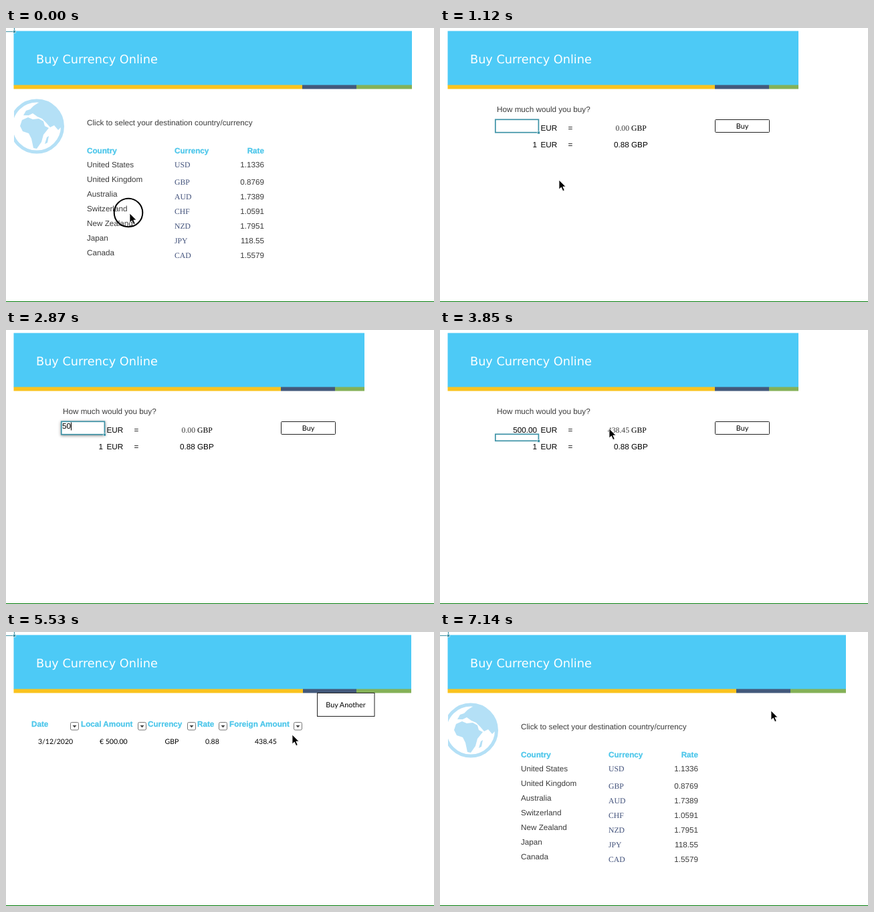
These frames come from a looping animation (640 px wide and 411 px high, 7210 ms). An HTML page:

```html
<!DOCTYPE html>
<html lang="en">
<head>
<meta charset="utf-8">
<title>Buy Currency Online</title>
<style>
  html, body { margin: 0; width: 100%; height: 100%; overflow: hidden; background: #fff; }
  svg { display: block; width: 100%; height: 100%; }
  text {
    font: 11.7px "Liberation Sans", Arial, sans-serif; fill: #3b3b3b;
    text-rendering: geometricPrecision;
  }
  .title { font: 17.7px "DejaVu Sans", Verdana, sans-serif; fill: #fff; }
  .head { font-weight: bold; fill: #4cc6ea; stroke: #4cc6ea; stroke-width: .25; }
  .code { font-family: "Liberation Serif", Times, serif; fill: #40507a; }
  .serif { font-family: "Liberation Serif", Times, serif; }
  .ink { fill: #000; }
  .cell { font: 10.5px Lato, sans-serif; fill: #000; }
  .label { font: 10.8px Lato, sans-serif; fill: #000; }
  .end { text-anchor: end; }
  .mid { text-anchor: middle; }
  .button { fill: #fff; stroke: #222; }
  .pressed .button { fill: #eee; stroke: #3c90ac; stroke-width: 1.6; }
  .pressed .label { fill: #777; }
  .select { fill: none; stroke: #3d92a6; stroke-width: 1.7; }
  .handle { fill: #3d92a6; stroke: #fff; stroke-width: .6; }
  .edit { fill: #fff; filter: drop-shadow(0 1px 2px #0007); }
  .land { fill: #b4e0f6; }
</style>
</head>
<body>
<svg viewBox="0 0 640 411">
  <defs>
    <clipPath id="sheet"><rect x="12" y="92" width="600" height="110"/></clipPath>
  </defs>

  <!-- data-on lists the spans in ms during which an element is visible -->
  <g data-on="0-840 6720-7210">
    <g data-banner="607 443 524"></g>
    <g clip-path="url(#sheet)">
      <circle cx="46" cy="147.5" r="38.5" fill="#fff" stroke="#b4e0f6" stroke-width="5"/>
      <path class="land" d="M24 138L33 134L40 137L49 136L56 140L58 147L64 150L56 160L53 171L46 181L41 180L38 166L34 158L25 155L21 147Z"/>
      <path class="land" d="M26 131L30 124L36 122L41 117L47 113L55 109L66 112L76 121L83 134L85 146L78 153L72 146L66 149L60 142L54 136L47 133L40 128L34 131Z"/>
      <path class="land" d="M61 164L64 162L62 172L58 174Z"/>
    </g>
    <text x="121" y="146">Click to select your destination country/currency</text>
    <text class="head" x="121" y="187.5">Country</text>
    <text class="head" x="252" y="187.5">Currency</text>
    <text class="head end" x="386" y="187.5">Rate</text>
    <g id="rates"></g>
  </g>

  <g data-on="840-4970">
    <g data-banner="536 411 492"></g>
    <text x="85" y="125.5">How much would you buy?</text>
    <text class="ink" x="150.5" y="154">EUR</text>
    <text class="ink" x="191.5" y="154">=</text>
    <text class="serif end" x="283" y="154" data-on="840-3220">0.00</text>
    <text class="serif end" x="283" y="154" data-on="3220-4970">438.45</text>
    <text class="serif ink" x="286" y="154">GBP</text>
    <text class="ink end" x="145" y="179">1</text>
    <text class="ink" x="150.5" y="179">EUR</text>
    <text class="ink" x="191.5" y="179">=</text>
    <text class="ink" x="260" y="179">0.88 GBP</text>
    <g data-press="4760-4970">
      <rect class="button" x="411.5" y="137.5" width="81" height="19" rx="1"/>
      <text class="label mid" x="452" y="151">Buy</text>
    </g>
    <g data-on="840-2240">
      <rect class="select" x="82.8" y="137.3" width="64.6" height="19.4"/>
      <rect class="handle" x="145.5" y="155" width="4" height="4"/>
    </g>
    <g data-on="2240-3220">
      <rect class="select edit" x="82.8" y="137.3" width="64.6" height="19.4"/>
      <rect class="handle" x="145.5" y="155" width="4" height="4"/>
      <text class="ink" id="typed" x="84" y="148"></text>
      <rect id="caret" y="138.5" width="1" height="12"/>
    </g>
    <text class="ink end" x="145" y="154" data-on="3220-4970">500.00</text>
    <g data-on="3220-4760">
      <rect class="select" x="82.8" y="156.3" width="64.6" height="10"/>
      <rect class="handle" x="145.5" y="164.5" width="4" height="4"/>
    </g>
  </g>

  <g data-on="4970-6720">
    <g data-banner="606 444 524"></g>
    <g id="orders"></g>
    <text class="cell" x="48" y="168">3/12/2020</text>
    <text class="cell" x="140" y="168">€ 500.00</text>
    <text class="cell" x="237.5" y="168">GBP</text>
    <text class="cell" x="298" y="168">0.88</text>
    <text class="cell" x="372" y="168">438.45</text>
    <g data-press="6510-6720">
      <rect class="button" x="465.5" y="91.5" width="85.5" height="35"/>
      <text class="label mid" x="508" y="113">Buy Another</text>
    </g>
    <rect class="handle" x="549" y="125" width="4.5" height="4.5" data-on="6510-6720"/>
  </g>

  <g data-on="0-560 4970-6510 6720-7210">
    <path class="select" style="stroke-width:1.2" d="M0 5.5H12.5V0"/>
    <rect class="handle" x="10.5" y="3.5" width="4" height="4"/>
  </g>
  <rect y="410" width="640" height="1" fill="#007a08"/>

  <g id="pointer">
    <circle cx="-2" cy="-1" r="21.3" fill="none" stroke="#000" stroke-width="2"
      data-on="0-140 560-700 4760-4900 6510-6650"/>
    <path d="M0 0V14L3.3 11L5.8 16.6L8.2 15.5L5.8 10.1H10Z" stroke="#fff" stroke-width=".8"/>
  </g>
</svg>

<script>
  const LOOP = 7210, STEP = 70;
  const $ = id => document.getElementById(id);

  const text = (x, y, cls, str) => `<text x="${x}" y="${y}" class="${cls}">${str}</text>`;
  const bar = (x, end, y, h, fill) =>
    `<rect x="${x}" y="${y}" width="${end - x}" height="${h}" fill="${fill}"/>`;

  for (const el of document.querySelectorAll('[data-banner]')) {
    const [right, navy, green] = el.dataset.banner.split(' ').map(Number);
    el.innerHTML = bar(11.5, right, 4.5, 81.5, '#4dcaf6') + bar(11.5, navy, 85.5, 6, '#fac31e') +
      bar(navy, green, 85.5, 6, '#43597b') + bar(green, right, 85.5, 6, '#84b157') +
      text(45, 52.5, 'title', 'Buy Currency Online');
  }

  $('rates').innerHTML = [
    ['United States', 'USD', '1.1336'], ['United Kingdom', 'GBP', '0.8769'],
    ['Australia', 'AUD', '1.7389'], ['Switzerland', 'CHF', '1.0591'],
    ['New Zealand', 'NZD', '1.7951'], ['Japan', 'JPY', '118.55'], ['Canada', 'CAD', '1.5579']
  ].map(([country, code, rate], i) => {
    const y = 209.2 + 21.95 * i, low = y + (i ? 4.2 : 0);
    return text(121, y, '', country) + text(252, low, 'code', code) + text(386, low, 'end', rate);
  }).join('');

  $('orders').innerHTML = [
    ['Date', 38, 102], ['Local Amount', 112, 203], ['Currency', 212, 277],
    ['Rate', 286, 324], ['Foreign Amount', 334, 436]
  ].map(([name, x, cx]) => text(x, 141.5, 'head', name) +
    `<rect x="${cx - 5.5}" y="135.5" width="12" height="11.5" rx="2" fill="#fff" stroke="#777"/>
     <path d="M${cx - 2.5} 140h6l-3 3.5z" fill="#444"/>`).join('');

  // Pointer stops: time, x, y
  const path = [
    [0, 185, 278], [140, 185, 278], [490, 178, 228], [3360, 178, 228],
    [3430, 196, 168], [3850, 253, 148], [4130, 325, 170], [4550, 428, 154],
    [5740, 428, 154], [6370, 495, 118]
  ];
  const keys = [[2240, '5'], [2520, '50'], [2940, '500']];

  const spans = str => str.split(' ').map(s => s.split('-').map(Number));
  const within = (list, t) => list.some(([a, b]) => t >= a && t < b);
  const collect = name => [...document.querySelectorAll(`[data-${name}]`)]
    .map(el => ({ el, list: spans(el.dataset[name]) }));
  const timed = collect('on'), buttons = collect('press');

  function pointerAt(t) {
    const i = path.findIndex(p => p[0] > t);
    if (i < 0) return path[path.length - 1].slice(1);
    const [t0, x0, y0] = path[i - 1], [t1, x1, y1] = path[i];
    const k = (t - t0) / (t1 - t0), e = k * k * (3 - 2 * k);
    return [x0 + (x1 - x0) * e, y0 + (y1 - y0) * e];
  }

  function draw(t) {
    for (const { el, list } of timed) el.style.display = within(list, t) ? '' : 'none';
    for (const { el, list } of buttons) el.classList.toggle('pressed', within(list, t));
    const typed = keys.filter(k => k[0] <= t).map(k => k[1]).pop() || '';
    $('typed').textContent = typed;
    $('caret').setAttribute('x', 84 + typed.length * 6.5);
    $('pointer').style.display = t >= 2240 && t < 3430 ? 'none' : '';
    $('pointer').setAttribute('transform', `translate(${pointerAt(t)})`);
  }

  const start = performance.now();
  function tick() {
    const t = (performance.now() - start) % LOOP;
    draw(Math.floor(t / STEP) * STEP);
    requestAnimationFrame(tick);
  }
  tick();
</script>
</body>
</html>
```
